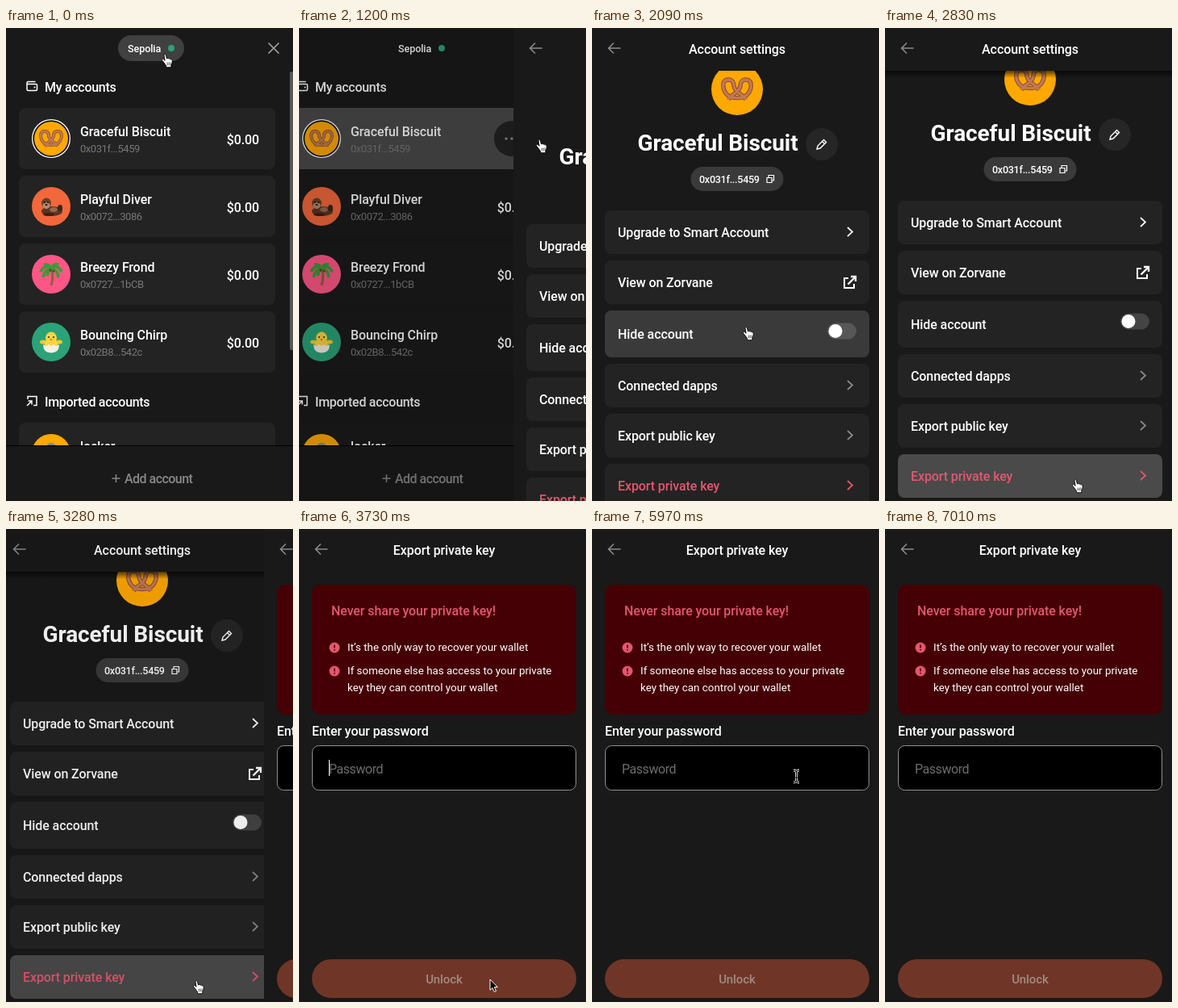
These frames come from a looping animation (356x586 px, 7.03 s). An HTML page:

```html
<!DOCTYPE html>
<html lang="en">
<head>
<meta charset="utf-8">
<title>Wallet: export private key</title>
<style>
  html, body { margin: 0; width: 100%; height: 100%; overflow: hidden; background: #191919; }
  svg { display: block; width: 100%; height: 100%; }
  text { font: 500 16px Roboto, Inter, sans-serif; letter-spacing: -.1px; fill: #fff; white-space: pre; }
  .tight { letter-spacing: -.3px; }
  .tighter { letter-spacing: -.55px; }
  .small { font-size: 12.6px; }
  .body { font-size: 13.4px; font-weight: 400; letter-spacing: 0; }
  .addr { font-size: 13px; font-weight: 400; letter-spacing: -.45px; fill: #777; }
  .title { font-size: 28px; font-weight: 700; }
  .mid { text-anchor: middle; }
  .end { text-anchor: end; }
  .pink { fill: #e4566f; }
  .grey { fill: #888; }
  .hint { font-weight: 400; letter-spacing: -.45px; fill: #6d6d6d; }
  .off { fill: #a18a83; font-size: 15px; }
  .bg { fill: #191919; }
  .card { fill: var(--card, #232323); }
  .hover { fill: #4a4a4a; opacity: 0; }
  .line { fill: none; stroke: #fff; stroke-width: 1.5; }
  .dim { pointer-events: none; opacity: 0; }
</style>
</head>
<body>
<svg id="stage" viewBox="0 0 356 586"></svg>
<script>
const LOOP = 7030, W = 356, H = 586;

// Drawing helpers; y is the middle of the capitals.
const text = (x, y, s, cls = '', shift = 5.5) => `<text x="${x}" y="${y + shift}" class="${cls}">${s}</text>`;
const rect = (x, y, w, h, r, attrs) => `<rect x="${x}" y="${y}" width="${w}" height="${h}" rx="${r}" ${attrs}/>`;
const dot = (x, y, r, fill) => `<circle cx="${x}" cy="${y}" r="${r}" fill="${fill}"/>`;
const oval = (x, y, rx, ry, fill) => `<ellipse cx="${x}" cy="${y}" rx="${rx}" ry="${ry}" fill="${fill}"/>`;
const line = (d, stroke = '#fff', width = 1.5) => `<path class="line" d="${d}" style="stroke:${stroke};stroke-width:${width}"/>`;
const at = (x, y, body, scale = 1) => `<g transform="translate(${x} ${y}) scale(${scale})">${body}</g>`;
const hoverable = (id, x, y, w, h, r, base = 'class="card"') =>
  rect(x, y, w, h, r, base) + rect(x, y, w, h, r, `class="hover" id="${id}"`);
const fullRect = attrs => rect(0, 0, W, H, 0, attrs);
const backArrow = line('M35.5 25H20.5m6.5-6.5l-6.5 6.5 6.5 6.5', '#8a8a8a', 1.6);

// Avatar pictures, centred on 0,0 for a 48 px disc.
const pretzelPath = 'M-8 9.5C-5 4 2 3 3-3C3-7 5-9 8-9C14-9 14-2 11 3C9 6 5 8 0 8S-9 6-11 3C-14-2-14-9-8-9C-5-9-3-7-3-3C-2 3 5 4 8 9.5';
const pictures = {
  pretzel: line(pretzelPath, '#8d4b2c', 4) + line(pretzelPath, '#c07a55', 2.5),
  otter: oval(1, 6, 13, 6, '#5b3423') + oval(-6, -4, 6, 6.5, '#6b4029') + oval(-6, -1, 4.5, 4, '#b08a70') +
    dot(-8, -5, 1, '#1c0f0a') + dot(-4, -5, 1, '#1c0f0a') + oval(-6, -2, 1.6, 1.1, '#24120c') +
    oval(3, 4, 5, 3, '#93694f') + oval(11, 2, 3, 4, '#402216') + oval(-3, 10, 7, 2, '#3d2117'),
  palm: line('M1-6Q3 4 0 14', '#90603e', 3) +
    line('M0-7Q-8-13-13-3M0-7Q-8-6-10 4M0-7Q8-13 13-3M0-7Q8-6 9 4M0-7Q-3-13-9-12M0-7Q3-14 9-12M0-7Q-4-3-5 2', '#3c9a3a', 3.6) +
    dot(-1, -5, 1.7, '#65452b') + dot(3, -4, 1.6, '#65452b'),
  chick: oval(0, -5, 7, 7.5, '#ffd63d') + oval(-10, 0, 4, 2.5, '#ffc928') + oval(10, 0, 4, 2.5, '#ffc928') +
    oval(0, 2, 8.5, 5, '#ffd63d') +
    '<path d="M-10 3l4 2 3-2 3 2 3-2 3 2 4-2Q10 13.5 0 13.5T-10 3" fill="#f5efe4"/>' +
    dot(-3, -6, 1.1, '#3a2a18') + dot(3, -6, 1.1, '#3a2a18') + '<path d="M-2-4h4L0-1z" fill="#f08122"/>',
  coin: oval(0, -6, 7, 7, '#7d8790')
};
const mainName = 'Graceful Biscuit';
const accounts = [
  [99, mainName, '0x031f...5459', 'pretzel', '#ffa800'],
  [183, 'Playful Diver', '0x0072...3086', 'otter', '#f2683c'],
  [267, 'Breezy Frond', '0x0727...1bCB', 'palm', '#ff5785'],
  [351, 'Bouncing Chirp', '0x02B8...542c', 'chick', '#2ba278'],
  [489, 'locker', '', 'coin', '#ffa800']
];
const account = ([y, name, addr, pic, colour], i) =>
  hoverable('account' + i, 16, y, 318, 76, 8) +
  (i ? '' : dot(56, y + 38, 24, '#fff') + dot(56, y + 38, 22.7, '#111')) +
  dot(56, y + 38, i ? 24 : 21, colour) + at(56, y + 38, pictures[pic]) +
  text(92, y + 29, name) + text(92, y + 50, addr, 'addr', 4.5) +
  `<g id="amount${i}">${text(314, y + 39, '$0.00', 'end')}</g>`;

const listPage =
  fullRect('class="bg"') +
  hoverable('pill', 139, 9, 82, 32, 16, 'fill="none"') +
  text(151, 25, 'Sepolia', 'small', 4.5) + dot(205, 25, 4, '#2ba278') +
  line('M325.5 18.5l13 13m0-13l-13 13', '#a0a0a0', 1.7) +
  line('M26 68v8a1.5 1.5 0 0 0 1.5 1.5H37a1.5 1.5 0 0 0 1.5-1.5v-5a1.5 1.5 0 0 0-1.5-1.5h-9.5a1.5 1.5 0 0 1 0-3h9') +
  dot(35.5, 73.5, 1, '#fff') + text(48, 73, 'My accounts', 'tight') +
  accounts.map(account).join('') +
  `<g id="menu">${dot(292, 137, 22, '#222')}${[285, 292, 299].map(x => dot(x, 137, 1.6, '#999')).join('')}</g>` +
  line('M27 460v-3.5h11v11h-4M26 468l6-6m-4.5 0H32v4.5') + text(48, 463, 'Imported accounts', 'tight') +
  rect(0, 517, W, 69, 0, 'class="bg"') + rect(0, 517, W, 1, 0, 'fill="#000"') +
  line('M131.5 558h10m-5-5v10', '#888') + text(147, 558, 'Add account', 'grey tighter') +
  rect(352, 54, 5, 345, 2, 'fill="#585858" id="scrollbar"');

const rows = [
  ['upgrade', 243, 'Upgrade to Smart Account', '#fff'],
  ['view', 305, 'View on Zorvane'],
  ['hide', 367, 'Hide account'],
  ['dapps', 433, 'Connected dapps', '#8a8a8a'],
  ['public', 495, 'Export public key', '#8a8a8a'],
  ['private', 557, 'Export private key', '#e4566f']
];
const row = ([id, y, label, chevron]) => {
  const h = id === 'hide' ? 58 : 54, middle = y + h / 2;
  return hoverable(id, 16, y, 328, h, 8) + text(32, middle + .5, label, id === 'private' ? 'pink' : '') +
    (chevron ? at(320, middle - .5, line('M-3-5.5L3 0-3 5.5', chevron, 1.7)) : '');
};
const settingsPage =
  fullRect('class="bg"') +
  '<g id="scroller">' +
  dot(180, 93, 32, '#ffa800') + at(180, 93, pictures.pretzel, 4 / 3) +
  text(156, 159, mainName, 'title mid', 10) +
  dot(285, 161, 20, '#262626') + at(285, 161, line('M-6 6l1-4L2.5-5.5l3 3L-2 5zM.5-3.5l3 3', '#fff', 1.4)) +
  rect(122.5, 189, 115, 30, 15, 'fill="#3a3a3a"') + text(133, 204, '0x031f...5459', 'small tight', 4.5) +
  at(221, 204, line('M-4-1.5h6v6h-6zM-2-1.5v-3h6.5v6.5H2', '#fff', 1.2)) +
  rows.map(row).join('') +
  at(319.5, 332, line('M-1.5-5H-6.5V7H5.5V2', '#fff', 2) + line('M1.5-7H7.5v6M7-6.5L-2 2.5', '#fff', 2.3)) +
  rect(292, 382.5, 36, 20, 10, 'fill="#fff" opacity=".15"') + dot(302, 392.5, 8.5, '#fff') +
  '</g>' +
  rect(0, 53, W, 9, 0, 'fill="url(#shade)" id="shadow"') +
  rect(0, 0, W, 53, 0, 'class="bg"') + backArrow + text(180, 26, 'Account settings', 'mid');

const alertIcon = y => dot(44, y, 6.5, '#e4566f') + line(`M44 ${y - 3.5}v4m0 1.5v1.6`, '#450005', 1.6);
const exportPage =
  fullRect('class="bg"') + backArrow + text(180, 26, 'Export private key', 'mid') +
  rect(16, 69, 328, 161, 10, 'fill="#450005"') +
  text(40, 101, 'Never share your private key!', 'pink') +
  alertIcon(147) + alertIcon(176) +
  text(60, 146, 'It’s the only way to recover your wallet', 'body', 5) +
  text(60, 175, 'If someone else has access to your private', 'body', 5) +
  text(60, 196, 'key they can control your wallet', 'body', 5) +
  text(16, 250, 'Enter your password') +
  rect(16.5, 268.5, 327, 55, 8, 'fill="#000" stroke="#909090"') +
  text(37, 297, 'Password', 'hint') +
  rect(37, 286, 1, 20, 0, 'fill="#fff" id="caret"') +
  rect(16, 533, 328, 48, 24, 'fill="#6f3627"') + text(180, 557.5, 'Unlock', 'off mid');

const handPath = 'M3.6 11L1 7.8C.4 6.6 1.7 5.6 2.7 6.6L4.2 8 3.2 2.2C3 .7 4.9.4 5.3 1.9L6.4 6C6.8 4.9 8.4 5 8.6 6.2 9.2 5.4 10.4 5.7 10.5 6.8 11.2 6.3 12.3 6.7 12.4 7.8 12.7 10 12 11.8 11.2 13V15.6H5.6V14Z';
const beamPath = 'M1 1q3 0 3.5 2v11q-.5 2-3.5 2M8 1q-3 0-3.5 2v11q.5 2 3.5 2M3 10h3';
const cursors = {
  hand: at(-.5, -.5, `<path d="${handPath}" fill="#fff" stroke="#000" stroke-width=".8"/>` +
    line('M7 10v3.5M8.8 10v3.5M10.5 10v3', '#000', .6), 1.1),
  arrow: '<path d="M1 1v13.2l3-2.7 2.2 4.9 2.3-1-2.2-4.8h4z" fill="#000" stroke="#fff"/>',
  beam: line(beamPath, '#fff', 2.8) + line(beamPath, '#000', 1.1)
};

document.getElementById('stage').innerHTML =
  '<defs><linearGradient id="shade" x2="0" y2="1"><stop stop-opacity=".65"/><stop offset="1" stop-opacity="0"/></linearGradient></defs>' +
  `<g id="list">${listPage}${fullRect('class="dim" id="listDim"')}</g>` +
  `<g id="settings">${settingsPage}${fullRect('class="dim" id="settingsDim"')}</g>` +
  `<g id="export">${exportPage}</g>` +
  Object.entries(cursors).map(([id, body]) => `<g id="${id}">${body}</g>`).join('');

// Each track lists [time, ...values]; a value holds until the next step.
const tracks = {
  cursor: [
    [0, 'hand', 193, 32], [300, 'hand', 198, 37], [450, 'arrow', 219, 66], [600, 'hand', 255, 106],
    [750, 'hand', 286, 131], [900, 'hand', 294, 138], [1650, 'arrow', 279, 185], [1800, 'hand', 240, 268],
    [1950, 'hand', 203, 340], [2090, 'hand', 187, 370], [2240, 'hand', 187, 374], [2380, 'hand', 193, 405],
    [2530, 'hand', 212, 485], [2680, 'hand', 228, 545], [2830, 'hand', 232, 559], [3430, 'arrow', 236, 557],
    [4030, 'arrow', 240, 525], [4180, 'arrow', 247, 425], [4330, 'beam', 250, 318], [4470, 'beam', 249, 298],
    [6260, 'arrow', 268, 385], [6410, 'arrow', 304, 551], [6560, 'none', 0, 0]
  ],
  hover: [
    [0, { pill: .8 }], [450, { pill: .4 }], [600, { account0: .5 }], [750, { account0: 1 }],
    [1650, {}], [1800, { upgrade: .5 }], [1950, { upgrade: .3, view: .5 }], [2090, { hide: .6 }],
    [2240, { hide: 1 }], [2530, { hide: .2, public: .6 }], [2680, { public: .3, private: .6 }],
    [2830, { private: 1 }], [3730, {}]
  ],
  menu: [[0, false], [600, true]],
  settingsX: [[0, W], [1200, 266], [1350, 40], [1500, 4], [1650, 0]],
  exportX: [[0, W], [3280, 320], [3430, 90], [3580, 8], [3730, 0]],
  scroll: [[0, 0], [1800, 3], [1950, 9], [2090, 17], [2240, 23], [2380, 27], [2530, 29]],
  shadow: [[0, 0], [2240, .2], [2380, .6], [2530, 1]],
  caret: [[0, 1], [4030, 0], [4470, 1], [5070, 0], [5520, 1], [5970, 0], [6560, 1], [7010, 0]]
};
const valueAt = (name, t) => tracks[name].findLast(step => step[0] <= t).slice(1);

const el = id => document.getElementById(id);
const move = (id, x, y = 0) => el(id).setAttribute('transform', `translate(${x} ${y})`);
const fade = (id, opacity) => { el(id).style.opacity = opacity; };
const show = (id, on) => { el(id).style.display = on ? '' : 'none'; };
const hovers = [...document.querySelectorAll('.hover')];

// A new page covers the old one, which drifts left and darkens.
function slide(below, above, x) {
  const progress = 1 - x / W;
  move(above, x);
  show(above, x < W);
  move(below, Math.round(-progress * W * .31));
  fade(below + 'Dim', Math.min(.5, progress * .7));
}

function draw(t) {
  const [settingsX] = valueAt('settingsX', t), [exportX] = valueAt('exportX', t);
  const [menu] = valueAt('menu', t), [levels] = valueAt('hover', t);
  const [kind, x, y] = valueAt('cursor', t);
  slide('list', 'settings', settingsX);
  // The settings page is still arriving until its own slide is over.
  if (settingsX === 0) slide('settings', 'export', exportX);
  else { show('export', false); fade('settingsDim', 0); }
  const leaving = settingsX < W;
  el('list').style.setProperty('--card', leaving ? '#1b1b1b' : '#232323');
  show('scrollbar', !leaving);
  show('menu', menu);
  show('amount0', !menu);
  for (const h of hovers) h.style.opacity = levels[h.id] || 0;
  move('scroller', 0, -valueAt('scroll', t)[0]);
  fade('shadow', valueAt('shadow', t)[0]);
  fade('caret', valueAt('caret', t)[0]);
  for (const id in cursors) show(id, id === kind);
  if (kind !== 'none') move(kind, x, y);
}

const start = performance.now();
function tick() {
  draw((performance.now() - start) % LOOP);
  requestAnimationFrame(tick);
}
tick();
</script>
</body>
</html>
```
